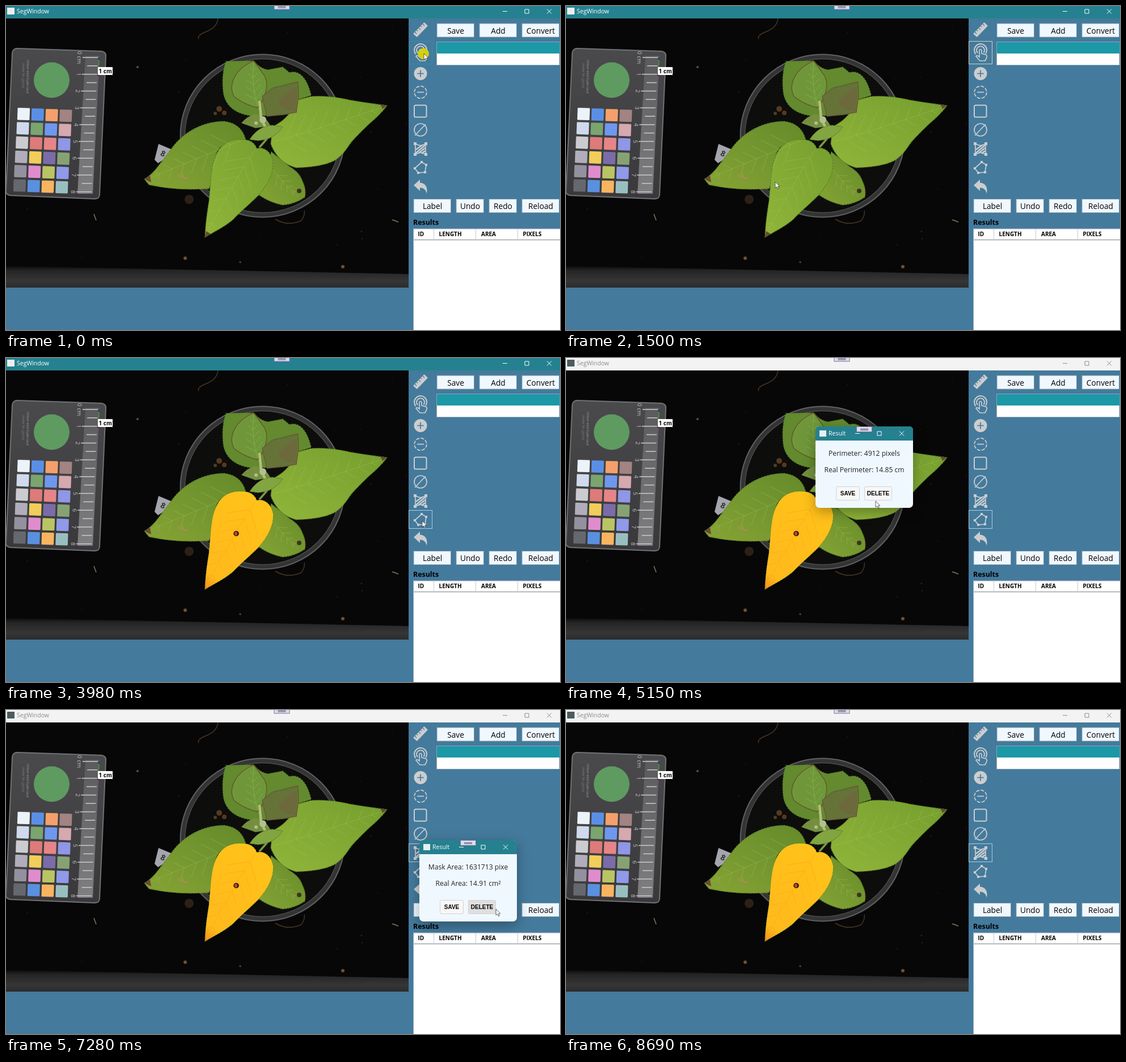
An HTML page that plays this animation: 977 by 573 pixels, repeating every 8760 ms.

```html
<!DOCTYPE html>
<html lang="en">
<head>
<meta charset="utf-8">
<title>SegWindow</title>
<style>
html, body { margin: 0; width: 100%; height: 100%; overflow: hidden; background: #447a9c; }
svg { display: block; width: 977px; height: 573px; }
text { font-family: "Open Sans", "Noto Sans", sans-serif; }
.mid { text-anchor: middle; }
.btn text { font-size: 13.7px; text-anchor: middle; }
.btn rect { fill: #f0f8ff; stroke: #8399a8; }
.head { font-size: 10px; font-weight: 700; }
.small { font: 700 10px "Liberation Sans", Arial, sans-serif; text-anchor: middle; }
.icon { fill: none; stroke: #cbcdce; stroke-width: 1.7; }
.solid { fill: #cbcdce; stroke: none; }
.focus { fill: none; stroke: #a9cfe2; }
.leaf { stroke: #557f22; stroke-width: 1.2; stroke-dasharray: 3 2; }
.vein { fill: none; stroke: #a3c15c; stroke-width: .8; opacity: .55; }
.dialog { transform-box: fill-box; transform-origin: center; filter: drop-shadow(0 7px 11px rgba(0,0,0,.3)); }

.step, .dialog, #cursor { animation: 8760ms infinite; }
.step { animation-timing-function: step-end; }
#inactive { animation-name: inactive; }
#mask { animation-name: mask; }
#marker { animation-name: marker; }
#press { animation-name: press; }
#touchHot { animation-name: touchHot; }
#touchFocus { animation-name: touchFocus; }
#areaFocus { animation-name: areaFocus; }
#polyFocus { animation-name: polyFocus; }
#perimeter { animation-name: perimeter; }
#area { animation-name: area; }
#perimeterHot { animation-name: perimeterHot; }
#areaHot { animation-name: areaHot; }
#cursor { animation-name: cursor; animation-timing-function: ease-in-out; }

@keyframes inactive {
  0%, 14.27%, 65.07%, 90.75% { opacity: 0 }
  5.14%, 52.51%, 75.34%, 99.2%, 100% { opacity: 1 }
}
@keyframes mask { 0% { opacity: 0 } 27.51%, 100% { opacity: 1 } }
@keyframes marker { 0% { opacity: 0 } 22.6%, 100% { opacity: 1 } }
@keyframes press {
  0%, 19.52%, 48.52%, 63.36%, 72.95%, 89.95% { opacity: 1 }
  1.48%, 20.32%, 49.32%, 64.16%, 73.74%, 90.75%, 100% { opacity: 0 }
}
@keyframes touchHot { 0% { opacity: 1 } 2.28%, 100% { opacity: 0 } }
@keyframes touchFocus { 0%, 19.52%, 100% { opacity: 0 } 2.28% { opacity: 1 } }
@keyframes areaFocus { 0%, 43.84% { opacity: 0 } 39.15%, 69.86%, 100% { opacity: 1 } }
@keyframes polyFocus { 0%, 72.95%, 100% { opacity: 0 } 43.84% { opacity: 1 } }
@keyframes perimeter {
  0%, 52.51%, 66.2%, 100% { opacity: 0; transform: scale(.92) }
  54.1%, 65.07% { opacity: 1; transform: none }
}
@keyframes area {
  0%, 75.34%, 91.9%, 100% { opacity: 0; transform: scale(.92) }
  76.94%, 90.75% { opacity: 1; transform: none }
}
@keyframes perimeterHot { 0%, 100% { opacity: 0 } 59.59% { opacity: 1 } }
@keyframes areaHot { 0%, 100% { opacity: 0 } 82.31% { opacity: 1 } }
@keyframes cursor {
  0%, .68% { transform: translate(737px, 84px) }
  9.93%, 11.64% { transform: translate(372px, 335px) }
  17.12%, 17.9% { transform: translate(369px, 311px) }
  18.7%, 25.91% { transform: translate(405px, 310px) }
  35.16%, 35.96% { transform: translate(835px, 352px) }
  39.95%, 43.04% { transform: translate(734px, 258px) }
  45.43%, 48.52% { transform: translate(734px, 288px) }
  53.2% { transform: translate(715px, 318px) }
  58.79%, 59.57% { transform: translate(546px, 253px) }
  61.6%, 65.07% { transform: translate(551px, 241px) }
  71.46%, 73.7% { transform: translate(730px, 254px) }
  78.42%, 79.22% { transform: translate(647px, 279px) }
  83.11%, 85.39% { transform: translate(864px, 352px) }
  86.19%, 89.95% { transform: translate(854px, 351px) }
  96.92%, 100% { transform: translate(985px, 552px) }
}
</style>
</head>
<body>
<svg viewBox="0 0 977 573">
  <defs>
    <linearGradient id="green" x1="0" y1="1" x2="1" y2="0">
      <stop stop-color="#91b53a"/><stop offset="1" stop-color="#749e2e"/>
    </linearGradient>
    <linearGradient id="shade" x1="0" y1="1" x2="1" y2="0">
      <stop stop-color="#86a435"/><stop offset="1" stop-color="#648a2a"/>
    </linearGradient>
    <linearGradient id="edge" x1="0" y1="0" x2="0" y2="1">
      <stop stop-color="#0c0c0c"/><stop offset=".2" stop-color="#242424"/>
      <stop offset=".7" stop-color="#363636"/><stop offset="1" stop-color="#2b2b2b"/>
    </linearGradient>
    <linearGradient id="card" x1="0" y1="0" x2="0" y2="1">
      <stop stop-color="#4a4a4c"/><stop offset="1" stop-color="#39393b"/>
    </linearGradient>
    <linearGradient id="strip" x1="0" y1="0" x2="0" y2="1">
      <stop stop-color="#5a5a5c"/><stop offset="1" stop-color="#7f7f82"/>
    </linearGradient>
    <linearGradient id="gold" x1="0" y1="1" x2=".5" y2="0">
      <stop stop-color="#f08a1c"/><stop offset=".14" stop-color="#ffb91c"/><stop offset="1" stop-color="#ffc21a"/>
    </linearGradient>
    <clipPath id="view"><rect y="22" width="710" height="476"/></clipPath>
    <path id="front" d="M351,409C352,385 354,370 358,345C362,310 360,280 374,257C385,238 405,234 425,237Q438,240 442,252C456,248 469,260 471,276C472,300 458,320 445,335C430,350 415,362 400,378C382,393 365,400 351,409Z"/>
  </defs>

  <rect width="977" height="573" fill="#447a9c"/>

  <g clip-path="url(#view)">
    <rect y="22" width="710" height="476" fill="#070707"/>
    <path d="M0,460L710,474V498H0Z" fill="url(#edge)"/>
    <g id="specks"/>
    <g fill="none" stroke="#4a3521" stroke-width="1.5">
      <path d="M374,22Q372,38 354,45T340,58M475,377Q496,390 520,380Q528,370 526,362"/>
      <path d="M681,378L692,382M155,368L159,379" stroke="#85775c"/>
    </g>

    <path d="M20,75L168,80Q177,81 176,90L165,334Q164,342 155,341L8,335Q-1,334 0,326L11,84Q12,75 20,75Z" fill="url(#card)" stroke="#727274" stroke-width="2"/>
    <path d="M140,88H165L153,332H126Z" fill="url(#strip)"/>
    <circle cx="80.500" cy="131" r="31.500" fill="#5f9a60"/>
    <g font-size="6" fill="#a2a2a4">
      <text transform="translate(37 95) rotate(91)">colour and scale card</text>
      <text transform="translate(29 101) rotate(91)" opacity=".6">made for plants</text>
    </g>
    <g id="ticks" stroke="#c6c6c8" stroke-width="1.600"/>
    <g id="patches"/>

    <g fill="none">
      <ellipse cx="452.500" cy="229.500" rx="141" ry="140" fill="#0d0d0c" stroke="#343435" stroke-width="9"/>
      <ellipse cx="452.500" cy="229.500" rx="145" ry="144" stroke="#606062" stroke-width="2"/>
      <ellipse cx="452.500" cy="229.500" rx="137" ry="136" stroke="#4b4b4c" stroke-width="1.300"/>
    </g>
    <path d="M262,272L269,244L293,254L281,270L268,278Z" fill="#a3a6ac"/>
    <text class="mid" transform="translate(277 261) rotate(25)" y="5" font-size="14" font-weight="700" fill="#333">8</text>
    <g fill="#553b1f"><circle cx="376" cy="182" r="5"/><circle cx="385" cy="189" r="4"/><circle cx="369" cy="190" r="3"/><circle cx="323" cy="342" r="8" opacity=".5"/></g>

    <path class="leaf" fill="#638a2f" d="M388,98L437,97Q448,111 462,113L488,108L500,118C518,112 532,130 538,158L516,165L510,190L440,195C400,192 385,172 383,150Q380,120 388,98Z"/>
    <path class="leaf" fill="url(#shade)" d="M468,258L500,284Q517,294 522,308Q530,324 527,338Q510,350 488,352Q464,347 446,334Z"/>
    <circle cx="517" cy="327" r="4" fill="#3d3420"/>
    <path d="M437,97C402,112 392,140 402,160Q420,174 443,180C464,155 463,130 452,118Z" fill="#6f973a" stroke="#675326" stroke-width="1.300"/>
    <path class="leaf" fill="url(#green)" d="M672,176C650,173 632,171 605,166Q570,158 538,160L515,166C503,190 489,205 470,213L467,244Q480,278 512,286C540,285 562,282 580,273C600,259 603,246 614,235Q628,220 642,207Q660,192 672,176Z"/>
    <path class="leaf" fill="url(#shade)" d="M244,306C262,296 270,280 290,255C310,225 345,204 385,204Q416,208 423,238C405,240 380,240 372,258C362,285 365,310 358,323Q300,327 252,316Z"/>
    <path d="M452,160L470,145L515,134L516,160L512,188L490,192L460,195Z" fill="#657339" stroke="#665833" stroke-width="1.300"/>
    <path d="M478,168L514,142L512,186L492,184Z" fill="#72643f" opacity=".65"/>
    <path d="M415,207Q426,194 440,191Q462,198 466,212L440,216Z" fill="#748f3f"/>
    <path d="M447,168L450,200L458,215" fill="none" stroke="#b2bf80" stroke-width="4.500"/>
    <path d="M447,250L466,228" fill="none" stroke="#82944b" stroke-width="3.500"/>
    <path d="M430,236C440,220 455,211 470,211L488,214Q474,236 445,238Z" fill="#82a541" stroke="#5f842b"/>
    <circle cx="453" cy="201" r="6" fill="#b4bf90"/>
    <circle cx="441" cy="207" r="3" fill="#b4bf90"/>
    <use href="#front" class="leaf" fill="url(#green)"/>
    <g id="veins"/>
    <path d="M244,306L254,300L256,312ZM351,409L353,398L361,403ZM672,176L660,174L664,182Z" fill="#6b4a2c"/>
    <path d="M303,300L322,306M309,293L315,306" stroke="#b58a5c" stroke-width="1.500"/>
    <g id="mask" class="step">
      <use href="#front" fill="url(#gold)"/>
      <g id="maskVeins"/>
    </g>
    <g id="marker" class="step">
      <circle cx="406" cy="310.500" r="4.700" fill="#111"/>
      <ellipse cx="405.500" cy="310.500" rx="2.700" ry="3.500" fill="#e5331d"/>
      <path d="M406,308V313" stroke="#4f8a2a"/>
    </g>
    <path d="M164,93L163,122" stroke="#4c9a25" stroke-width="1.500"/>
    <circle cx="164" cy="93.500" r="2" fill="#164a86"/>
    <circle cx="163" cy="122" r="2" fill="#5c1a12"/>
    <rect x="162" y="108" width="26" height="14" fill="#fff"/>
    <text class="head" x="163.500" y="118.500">1 cm</text>
  </g>

  <g class="icon">
    <g transform="translate(731 42) rotate(-46)">
      <rect class="solid" x="-14" y="-4.500" width="28" height="9" rx="1"/>
      <path d="M-10,-4.500V0M-5,-4.500V-1.500M0,-4.500V0M5,-4.500V-1.500M10,-4.500V0" stroke="#447a9c" stroke-width="1.300"/>
    </g>
    <path d="M722.500,85A11,11 0 1 1 740,84.500M726,83A7,7 0 1 1 736.500,82.500" stroke-width="2"/>
    <path d="M729,90V78Q731,75 733,78V84L740,86Q743,87 742,91L739,97H730L723,89Q724,86 729,90Z"/>
    <circle class="solid" cx="731" cy="119.500" r="11.500"/>
    <path d="M725,119.500H737M731,113.500V125.500" stroke="#447a9c"/>
    <circle cx="731" cy="152.500" r="10.800" stroke-dasharray="6.200 2.280"/>
    <path d="M725,152.500H737"/>
    <rect x="720" y="175.500" width="21.500" height="21" rx="2.500" stroke-width="2"/>
    <circle cx="731" cy="219" r="11"/>
    <path d="M740,209L721,229"/>
    <path d="M722,244L731,247L740,244V262L731,259L722,262Z"/>
    <path d="M723,254L734,246M723,260L739,246M728,260L739,251M733,261L739,256" stroke-width="2.500"/>
    <path class="solid" d="M719,241h5v5h-5zM738,241h5v5h-5zM719,260h5v5h-5zM738,260h5v5h-5z"/>
    <path d="M721,287L733,276L741,281L739,294L727,295Z"/>
    <path class="solid" d="M719,285h4v4h-4zM731,274h4v4h-4zM739,279h4v4h-4zM737,292h4v4h-4zM725,293h4v4h-4z"/>
    <path class="solid" d="M719,317L730,307V312.500C740,313 744,321 742,332C740,324 736,321.500 730,321.500V327Z"/>
  </g>
  <g class="focus">
    <rect id="touchHot" class="step" x="711.500" y="62.500" width="40" height="40" stroke="#2497a8"/>
    <rect id="touchFocus" class="step" x="710.500" y="62.500" width="41" height="40" stroke="#d8d0bb"/>
    <rect id="areaFocus" class="step" x="710.500" y="236.500" width="41" height="32"/>
    <rect id="polyFocus" class="step" x="710.500" y="269.500" width="41" height="32"/>
  </g>

  <g id="buttons" class="btn"/>
  <rect x="759.500" y="63.500" width="216.500" height="41" fill="#fff" stroke="#8fa3b2"/>
  <rect x="760" y="64" width="216" height="20" fill="#1d98a6"/>
  <text x="718" y="387" font-size="12.400" font-weight="700">Results</text>
  <rect x="718.500" y="394" width="262" height="182" fill="#fff" stroke="#8aa4bc"/>
  <path d="M718,413.500H977" stroke="#b3b5ba" stroke-width="2"/>
  <path d="M754.500,394V412M828.500,394V412M902.500,394V412" stroke="#c3c9d6"/>
  <g class="head">
    <text x="726.500" y="407">ID</text><text x="763.500" y="407">LENGTH</text>
    <text x="838" y="407">AREA</text><text x="911.500" y="407">PIXELS</text>
  </g>

  <rect width="977" height="22" fill="#25818f"/>
  <g id="active"/>
  <g id="inactive" class="step"><rect width="977" height="22" fill="#f3f3f3"/></g>
  <g id="grip" transform="translate(472.500 -3.500)"/>

  <g id="dialogs"/>

  <g id="cursor">
    <circle id="press" class="step" cx="-1" cy=".5" r="10" fill="#d2cf16" opacity=".85"/>
    <path d="M0,0V11L2.600,8.700L4.500,12.800L6.200,12L4.400,8.100H7.900Z" fill="#fff" stroke="#222" stroke-width=".7"/>
  </g>
</svg>

<script>
const $ = id => document.getElementById(id);
const add = (id, markup) => $(id).insertAdjacentHTML('beforeend', markup);
const range = n => [...Array(n).keys()];

const grip = `<rect x=".5" y=".5" width="27" height="9" fill="#dcdcea" stroke="#77779c"/>
  <path d="M7,4.500H21M7,6.500H21" stroke="#55557c"/>`;
add('grip', grip);

const controls = (x, y, color) => `<path d="M${x},${y}h8M${x + 39},${y - 3.5}h7v7h-7zM${x + 78},${y - 4}l8,8m0,-8l-8,8"
  fill="none" stroke="${color}"/>`;
const titleBar = (text, icon) => `<rect x="2" y="3" width="13" height="12" fill="${icon}"/>
  <text x="19" y="13" font-size="10.5" fill="${text}">SegWindow</text>${controls(876, 9.5, text)}`;
add('active', titleBar('#fff', '#e9eff0'));
add('inactive', titleBar('#8b8b8b', '#4b5c60'));

const button = ([label, x, y, w]) => `<rect x="${x}" y="${y}" width="${w + .5}" height="24"/>
  <text x="${x + w / 2 + .5}" y="${y + 17.5}">${label}</text>`;
add('buttons', [
  ['Save', 760, 31, 65], ['Add', 835, 31, 65], ['Convert', 910, 31, 65],
  ['Label', 719, 341.5, 65], ['Undo', 794, 341.5, 48], ['Redo', 852, 341.5, 48], ['Reload', 910, 341.5, 65]
].map(button).join(''));

const dialog = (id, x, y, lines) => `<g transform="translate(${x} ${y})"><g id="${id}" class="dialog">
  <rect width="172" height="144" rx="7" fill="#f0f8ff"/>
  <path d="M0,25V7Q0,0 7,0H165Q172,0 172,7V25Z" fill="#25818f"/>
  <rect x="7" y="7" width="12" height="11" fill="#e9eff0"/>
  <text x="23" y="16" font-size="10.5" fill="#fff">Result</text>
  ${controls(70, 12.5, '#fff')}<g transform="translate(72)">${grip}</g>
  ${lines.map((s, i) => `<text class="mid" x="86" y="${52 + i * 28.5}" font-size="12.15" fill="#222">${s}</text>`).join('')}
  <g fill="#f7f7f7" stroke="#d2d2d2">
    <rect x="36.5" y="106.500" width="41" height="24" rx="2.500"/>
    <rect x="86.500" y="106.500" width="48" height="24" rx="2.500"/>
    <rect id="${id}Hot" class="step" x="86.500" y="106.500" width="48" height="24" rx="2.500" fill="#dfdfdf"/>
  </g>
  <text class="small" x="57" y="122">SAVE</text><text class="small" x="110.500" y="122">DELETE</text>
</g></g>`;
add('dialogs', dialog('perimeter', 440, 121, ['Perimeter: 4912 pixels', 'Real Perimeter: 14.85 cm']));
add('dialogs', dialog('area', 729, 230, ['Mask Area: 1631713 pixe', 'Real Area: 14.91 cm²']));

const colors = `eef2fb 5b8fe6 f5a06b a38383 d0daee 7aa56f 6f97ee d5a9b0
  cbcbd0 dd7b78 e58587 8f97e6 b0aebb f2cd5b 7a6ca8 86a274
  93919f e08ccc b9c564 8f9ae8 67686f 5a90e0 f7b55f 98bfc0`.split(/\s+/);
add('patches', colors.map((c, i) => {
  const col = i % 4, row = i >> 2;
  const x = 31 + col * 24.8 - row * 1.4, y = 191 + col + row * 25.3;
  return `<rect x="-10.800" y="-10.800" width="21.600" height="21.600" rx="1.500" fill="#${c}" transform="translate(${x} ${y}) rotate(2)"/>`;
}).join(''));

add('ticks', range(17).map(i => {
  const x = 164 - i * .7, y = 91 + i * 14.85, long = i % 2 ? 20 : 29;
  const label = i % 2 ? '' : `<text class="mid" transform="translate(${x - 38} ${y}) rotate(92)"
    font-size="10" fill="#c6c6c8" stroke="none">${i ? i / 2 : '0 cm'}</text>`;
  return `<path d="M${x - long},${y}H${x - 2}"/>${label}`;
}).join(''));

// Midrib as a quadratic curve with side veins leaning towards the tip.
function veins([x0, y0], [x1, y1], [x2, y2], width, n) {
  let d = `M${x0},${y0}Q${x1},${y1} ${x2},${y2}`;
  for (let i = 1; i < n; i++) {
    const t = i / n, u = 1 - t;
    const x = u * u * x0 + 2 * u * t * x1 + t * t * x2;
    const y = u * u * y0 + 2 * u * t * y1 + t * t * y2;
    const a = Math.atan2(u * (y1 - y0) + t * (y2 - y1), u * (x1 - x0) + t * (x2 - x1));
    const r = width * Math.pow(u, .7);
    for (const side of [-.85, .85])
      d += `M${x},${y}l${r * Math.cos(a + side)},${r * Math.sin(a + side)}`;
  }
  return `<path class="vein" d="${d}"/>`;
}
const frontVeins = veins([440, 253], [402, 310], [352, 407], 48, 8);
add('veins', frontVeins
  + veins([472, 240], [560, 215], [669, 177], 50, 9)
  + veins([415, 238], [340, 268], [248, 307], 44, 8)
  + veins([470, 290], [490, 315], [515, 338], 22, 5)
  + veins([444, 178], [432, 140], [437, 100], 24, 6));
add('maskVeins', frontVeins.replace('class="vein"', 'fill="none" stroke="#ffaa12" stroke-width=".8"'));

let seed = 7;
const rand = () => (seed = seed * 16807 % 2147483647) / 2147483647;
add('specks', range(60).map(() =>
  `<circle cx="${rand() * 710}" cy="${24 + rand() * 435}" r="${.4 + rand() * .8}" fill="#4a3a28" opacity="${.2 + rand() * .5}"/>`).join('')
  + [[316, 446, 3], [594, 461, 3], [232, 108, 2], [413, 453, 1.5]].map(([x, y, r]) =>
    `<circle cx="${x}" cy="${y}" r="${r}" fill="#71502f"/>`).join(''));
</script>
</body>
</html>
```
